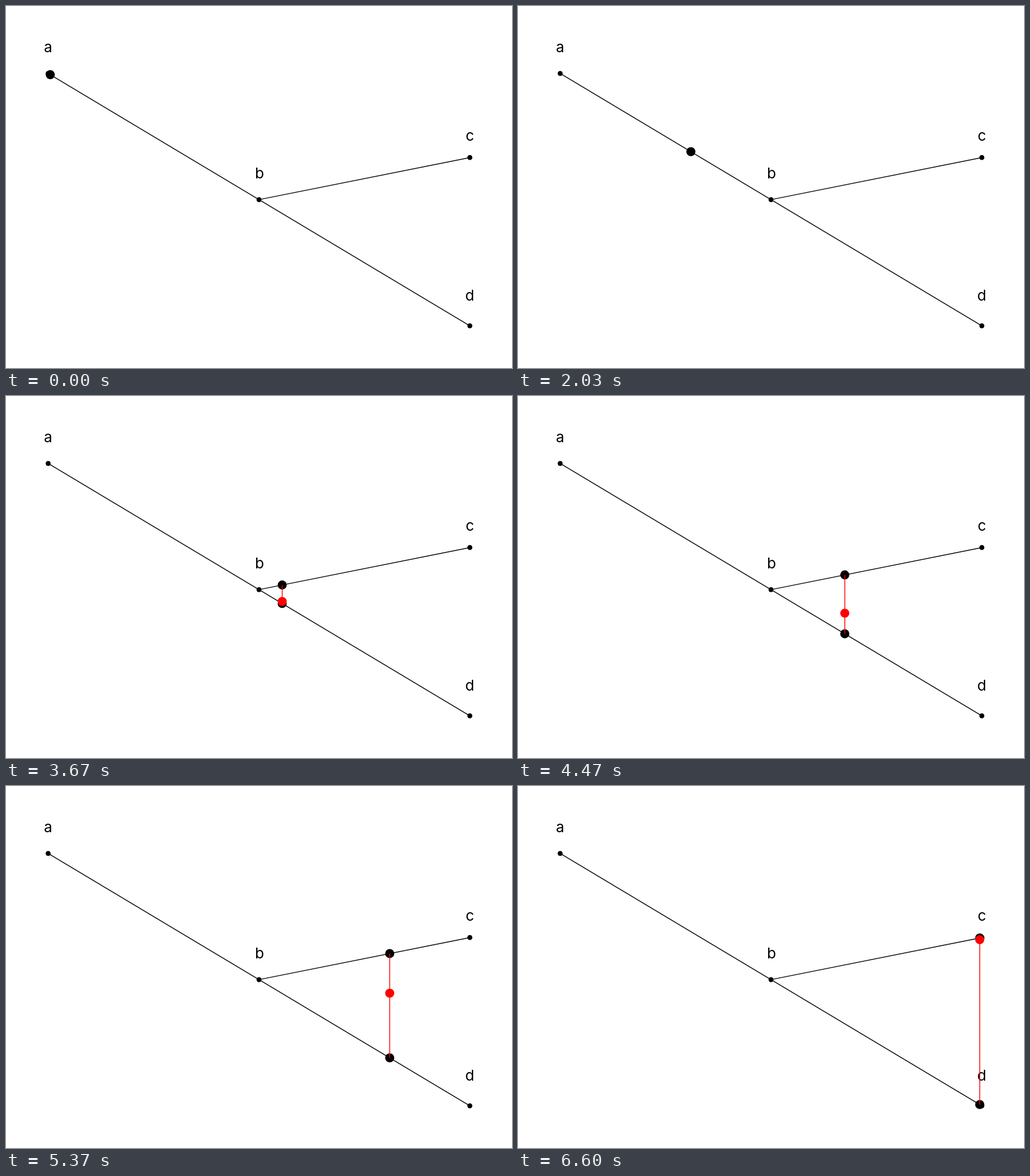
Animation, 884 px wide and 634 px high, one loop 6630 ms. Source, as an HTML page with a canvas:

```html
<!DOCTYPE html>
<html lang="en">
<head>
<meta charset="utf-8">
<title>Branching blend</title>
<style>
  html, body { margin: 0; width: 100%; height: 100%; overflow: hidden; background: #fff; }
  canvas { display: block; }
</style>
</head>
<body>
<canvas id="stage" width="884" height="634"></canvas>
<script>
const ctx = document.getElementById('stage').getContext('2d');
const W = 884, H = 634, LOOP = 6630;
const U = W / 12;
const RED = '#f00', BLACK = '#000';

const at = (x, y) => ({ x: W / 2 + x * U, y: H / 2 + y * U });
const a = at(-5, -2.7), b = at(0, 0.3), c = at(5, -0.7), d = at(5, 3.3);

// text, anchor, horizontal nudge in px, baseline lift in units
const labels = [
  ['a', a, 0, 0.5],
  ['b', b, 1, 0.5],
  ['c', c, 0, 0.4],
  ['d', d, 0, 0.6]
];

const mix = (p, q, s) => ({ x: p.x + (q.x - p.x) * s, y: p.y + (q.y - p.y) * s });

function line(p, q, color) {
  ctx.strokeStyle = color;
  ctx.lineWidth = 1.45;
  ctx.beginPath();
  ctx.moveTo(p.x, p.y);
  ctx.lineTo(q.x, q.y);
  ctx.stroke();
}

function dot(p, r, color) {
  ctx.fillStyle = color;
  ctx.beginPath();
  ctx.arc(p.x, p.y, r, 0, Math.PI * 2);
  ctx.fill();
}

function scene() {
  ctx.fillStyle = '#fff';
  ctx.fillRect(0, 0, W, H);
  line(a, b, BLACK);
  line(b, c, BLACK);
  line(b, d, BLACK);
  for (const p of [a, b, c, d]) dot(p, 4.35, BLACK);
  ctx.font = '26px Inter, "Noto Sans", sans-serif';
  ctx.textAlign = 'center';
  for (const [text, p, dx, lift] of labels) ctx.fillText(text, p.x + dx, p.y - lift * U);
}

function draw(ms) {
  // 30 steps per second on a 10 ms clock, 100 steps per half
  const step = 1 + Math.floor((Math.floor(ms / 10) * 10 + 5) * 0.03);
  const R = 7.95;
  scene();
  if (step < 100) {
    dot(mix(a, b, step / 100), R, BLACK);
    return;
  }
  const s = step / 100 - 1;
  const top = mix(b, c, s), low = mix(b, d, s);
  dot(top, R, BLACK);
  dot(low, R, BLACK);
  line(top, low, RED);
  dot(mix(low, top, s), R, RED);
}

const start = performance.now();
function tick() {
  draw((performance.now() - start) % LOOP);
  requestAnimationFrame(tick);
}
tick();
</script>
</body>
</html>
```
